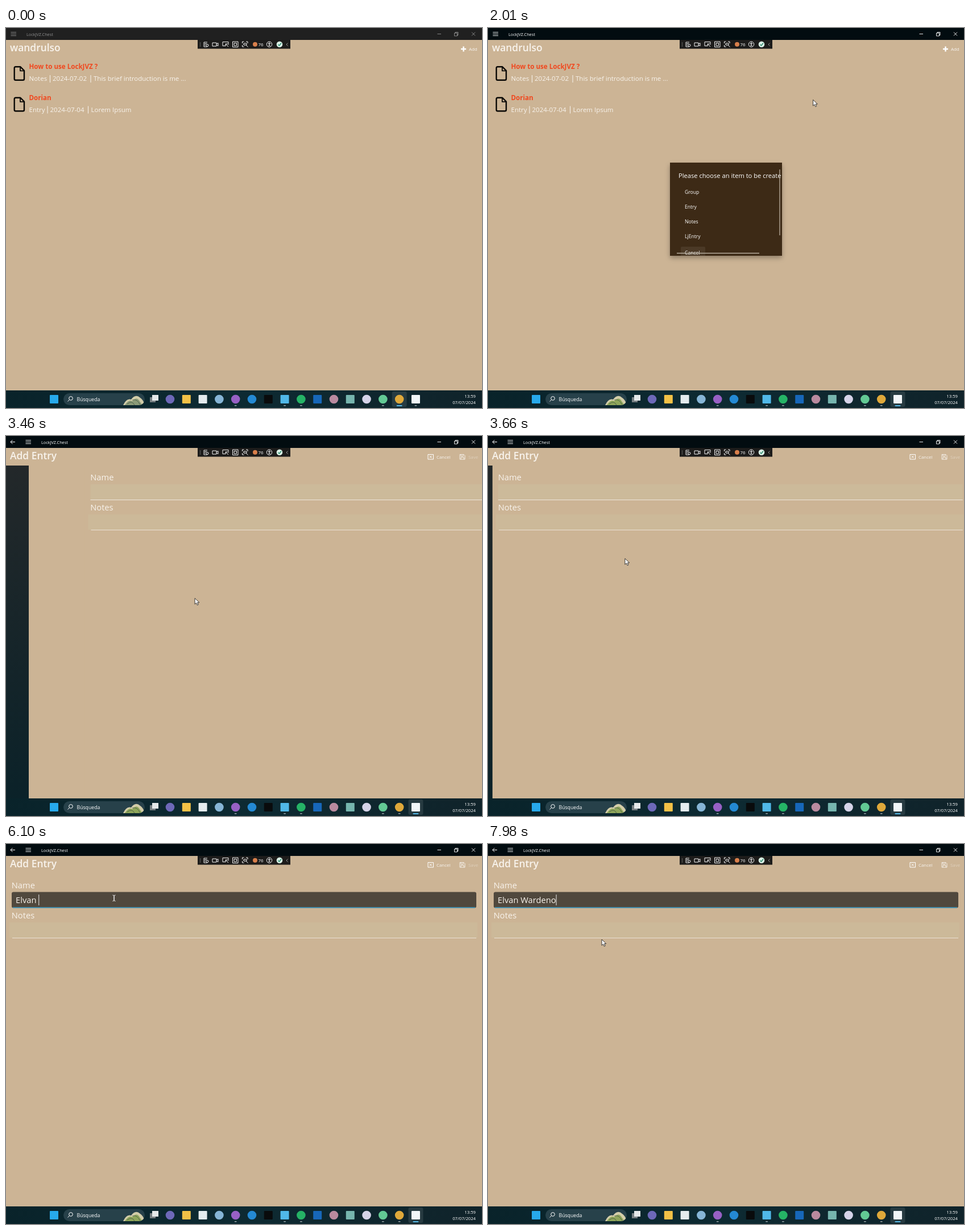
Recreate the animation shown at these times as an HTML page. Size 837x669 px, loop 8 s.

```html
<!DOCTYPE html>
<html lang="es">
<head>
<meta charset="utf-8">
<title>Vault</title>
<style>
  html, body { margin: 0; width: 100%; height: 100%; overflow: hidden; background: #ccb495; }
  svg { display: block; width: 837px; height: 669px; font-family: "Open Sans", "Noto Sans", sans-serif; }
  text { white-space: pre; }
  .line { fill: none; stroke: #fff; }
  .head { font-size: 17.4px; font-weight: 600; fill: #f8f3ec; }
  .name { font-size: 11.6px; font-weight: 700; fill: #f0481f; }
  .sub { font-size: 11.5px; fill: #f8f3ec; }
  .field { font-size: 14.7px; fill: #f8f3ec; }
  .item { font-size: 8.6px; fill: #fff; }
  .tool { font-size: 7.9px; fill: #fff; }
</style>
</head>
<body>
<svg viewBox="0 0 837 669">
  <defs>
    <linearGradient id="edge" x2="0" y2="1"><stop stop-color="#23282a"/><stop offset="1" stop-color="#0b2229"/></linearGradient>
    <linearGradient id="bar"><stop stop-color="#09232a"/><stop offset=".5" stop-color="#0d2a32"/><stop offset="1" stop-color="#10232a"/></linearGradient>
    <filter id="shade" x="-10%" y="-10%" width="120%" height="125%"><feDropShadow dx="0" dy="4" stdDeviation="4" flood-opacity=".3"/></filter>
    <clipPath id="box"><path d="M320 237h197v164H320z"/></clipPath>
    <clipPath id="pill"><rect x="101" y="643" width="143" height="21" rx="10.5"/></clipPath>
    <g id="doc" fill="none" stroke="#0a0805" stroke-width="2.4" stroke-linejoin="round">
      <path d="M17 68.3h8.3l6.7 6.7v14.4q0 2.3-2.3 2.3H17q-2.3 0-2.3-2.3V70.6q0-2.3 2.3-2.3z"/>
      <path d="M25 69v6.4h6.5" stroke-width="1.8"/>
    </g>
  </defs>

  <path d="M0 0h837v669H0z" fill="#ccb495"/>

  <g id="list">
    <text class="head" x="7" y="41">wandrulso</text>
    <path id="addHover" d="M793 22h44v30h-44z" fill="#fff" opacity="0"/>
    <path d="M800 37h9M804.500 32.500v9" class="line" stroke-width="2.400"/>
    <text class="tool" x="814" y="40" opacity=".85">Add</text>
    <use href="#doc"/><use href="#doc" y="54.500"/>
    <text class="name" x="40.500" y="72">How to use LockJVZ ?</text>
    <text class="sub" y="92.800"><tspan x="40.500">Notes</tspan><tspan x="82">2024-07-02</tspan><tspan x="154">This brief introduction is me ...</tspan></text>
    <text class="name" x="40.500" y="126.800">Dorian</text>
    <text class="sub" y="147.500"><tspan x="40.500">Entry</tspan><tspan x="77.500">2024-07-04</tspan><tspan x="149.500">Lorem Ipsum</tspan></text>
    <path d="M77.500 83v13M149 83v13M73 137.500v13M144.500 137.500v13" class="line" opacity=".85"/>
  </g>

  <g id="form">
    <text class="head" x="7" y="41">Add Entry</text>
    <g class="line">
      <path d="M742 32.500h9.500v8.500H742zM744.700 34.700l4 4M748.700 34.700l-4 4"/>
      <path d="M798 32.500h7l2 2v6.500h-9zM800 32.500v3h4v-3M800 41v-3.500h5V41" opacity=".75"/>
    </g>
    <text class="tool" x="757" y="40" opacity=".85">Cancel</text>
    <text class="tool" x="813" y="40" opacity=".35">Save</text>
    <path d="M0 52h40v586H0z" fill="url(#edge)"/>
    <g id="page">
      <path d="M0 52h837v586H0z" fill="#ccb495"/>
      <text class="field" x="9.800" y="77.500">Name</text>
      <text class="field" x="9.800" y="130.500">Notes</text>
      <g id="idle">
        <path d="M10 85h817v27.500H10z" fill="#ccba9a"/>
        <path d="M10 112.500h817" class="line" opacity=".65"/>
      </g>
      <path d="M6 138h823v27H6z" fill="#ccb999"/>
      <path d="M11 165.500h816" class="line" opacity=".6"/>
      <g id="active">
        <rect x="10" y="84.500" width="817" height="28" rx="3" fill="#50483d"/>
        <path d="M12 112h813" stroke="#3d9fc8" stroke-width="1.500"/>
        <text id="typed" class="field" x="17" y="103.500"></text>
        <path id="caret" d="M.5 89v19" class="line" stroke-width=".9"/>
      </g>
    </g>
  </g>

  <g id="dialog">
    <path d="M320 237h197v164H320z" fill="#3d2c17" filter="url(#shade)"/>
    <g clip-path="url(#box)">
      <text x="335" y="263.700" font-size="11.150" fill="#fff">Please choose an item to be create</text>
      <rect id="rowHover" x="338" width="180" height="23" rx="2" fill="#fff" opacity=".06"/>
      <g id="items"></g>
      <rect x="339" y="385" width="43" height="20" rx="2" fill="#fff" opacity=".07"/>
      <text class="item" x="346" y="398.500">Cancel</text>
      <path d="M332 396.500h145M513 249v116" stroke="#b9ae9f" stroke-width="1.300"/>
    </g>
  </g>

  <path id="titleBar" d="M0 0h837v21H0z"/>
  <g id="chrome">
    <path id="back" d="M16 10.500H8M11.500 7L8 10.500l3.500 3.500" class="line"/>
    <path id="menu" d="M8.500 7.500h9.500M8.500 10.500h9.500M8.500 13.500h9.500" class="line" stroke-width=".9"/>
    <text id="title" y="13.500" font-size="7.300" fill="#fff">LockJVZ.Chest</text>
    <path d="M758.500 10.500h6.500M788.500 9h5v5h-5zM790 9V7.500h5V12.500h-1.500M819 7.500l6 6M825 7.500l-6 6" class="line" stroke-width=".9"/>
  </g>

  <path d="M337 21h163v15.500H337z" fill="#1d1c1b"/>
  <g class="line" stroke-width=".95">
    <path d="M341.500 25v8" opacity=".3"/>
    <path d="M354 33h-6v-8h6M349 27.500h4M349 30h2"/><circle cx="354" cy="30.500" r="2"/>
    <path d="M363 26h7v6h-7zM370 28l3-1.500v5l-3-1.500"/>
    <path d="M386 31.500h-5V24.500h10v5M386 28l5 5M386 28v4M386 28h4"/>
    <path d="M398.500 24h9.500v9.500h-9.500zM401 26.500h4.500v4.500H401z"/>
    <path d="M415.500 27v-3h3M422 24h3v3M415.500 30v3h3M418 27h5v3h-5zM422 30l3.500 3.500"/>
    <circle cx="463" cy="28.700" r="4.700"/><path d="M460.500 27.500h5M463 27.500v2l-1.500 2.500M463 29.500l1.500 2.500"/><circle cx="463" cy="26" r=".4"/>
    <path d="M495.500 26.500l-2.500 2.500 2.500 2.500" opacity=".6"/>
  </g>
  <circle cx="438" cy="28.700" r="4" fill="#d97f4b"/>
  <text x="443.500" y="31.700" font-size="8" fill="#fff">76</text>
  <circle cx="481" cy="28.700" r="5.300" fill="#d9eee4"/>
  <path d="M478.500 29l2 2 3.500-4.500" fill="none" stroke="#26886b" stroke-width="1.300"/>

  <path d="M0 638h837v31H0z" fill="url(#bar)"/>
  <g clip-path="url(#pill)">
    <path d="M101 643h143v21H101z" fill="#27414a"/>
    <path d="M206 664q6-13 14-10 8-11 16-3 6 4 8 13z" fill="#d3cda9"/>
    <path id="hill" d="M209 664q7-11 13-7 8-9 13 0l5 7z"/>
    <path d="M213 662q9-7 13 2M222 655q9-3 14 9" fill="none" stroke="#405440" stroke-width=".8"/>
  </g>
  <g class="line"><circle cx="114" cy="652" r="3.300"/><path d="M111.500 654.500l-3 3"/></g>
  <text x="124.500" y="656.500" font-size="8.700" fill="#fff">Búsqueda</text>
  <path d="M253 650h10v9h-10z" fill="#777f82"/><path d="M257 646h11v10h-11z" fill="#e5e8e9"/>
  <rect id="spot" y="640" width="26" height="27" rx="3" fill="#fff" opacity=".1"/>
  <g id="icons"></g>
  <rect id="mark" y="664" width="10" height="2" rx="1" fill="#55b9e8"/>
  <g font-size="7.700" fill="#fff" text-anchor="end"><text x="826" y="651">13:59</text><text x="826" y="661.500">07/07/2024</text></g>

  <g id="pointer">
    <path id="arrow" d="M0 0v10.500l2.500-2.300 1.700 3.900 1.900-.8-1.700-3.800h3.400z" fill="#fff" stroke="#111" stroke-width=".8"/>
    <path id="beam" d="M-2.500-5q2.500 0 2.500 1.500V4q0 1.500-2.500 1.500M2.500-5Q0-5 0-3.500V4q0 1.500 2.500 1.500" fill="none" stroke="#eee"/>
  </g>
</svg>
<script>
const $ = id => document.getElementById(id);
const show = (id, on) => $(id).style.display = on ? "" : "none";
const opacity = (id, v) => $(id).setAttribute("opacity", v);
const move = (id, x, y = 0) => $(id).setAttribute("transform", `translate(${x} ${y})`);
const ramp = (t, from, to) => Math.min(1, Math.max(0, (t - from) / (to - from)));

const LOOP = 8000, FOCUS = 1670, PAGE = 3460, EDIT = 4270;
const ROW = 26.2, ROW_TOP = 276;
const NAME = "Elvan Wardeno";
const KEYS = [5210, 5480, 5570, 5670, 5770, 5930, 6130, 6390, 6510, 6640, 6790, 7030, 7240];
const PATH = [ // time, x, y
  [400, 840, 190], [890, 808, 37], [1670, 808, 37], [2010, 572, 126], [2410, 410, 290],
  [2510, 410, 290], [3010, 376, 331], [3300, 368, 312], [3400, 360, 307],
  [3660, 241, 216], [4060, 190, 95], [7770, 190, 95], [7980, 200, 168]
];

$("items").innerHTML = ["Group", "Entry", "Notes", "LjEntry"]
  .map((s, i) => `<text class="item" x="346" y="${290.5 + i * ROW}">${s}</text>`).join("");

// colour, then "o" for round; spaced evenly from the third slot on
const APPS = ["#6d68b8o", "#f3c146", "#e4ebee", "#86b5d6o", "#9860c5o", "#2489d3o", "#090b0c",
  "#50b8e8", "#25b366o", "#1767b9", "#b98a9fo", "#76b5ae", "#d5d3e8o", "#62c994o", "#dfa83ao", "#f2f6f8"];
const shape = (x, spec) => {
  const fill = spec.slice(0, 7);
  return spec[7] ? `<circle cx="${x}" cy="653.5" r="7.8" fill="${fill}"/>`
    : `<rect x="${x - 7.5}" y="646" width="15" height="15" rx="1" fill="${fill}"/>`;
};
const slot = i => 288.5 + i * 28.8;
$("icons").innerHTML = shape(84.5, "#27a9eb") + APPS.map((a, i) => shape(slot(i), a)).join("") +
  [4, 7, 8, 13, 14, 15].map(i => `<rect x="${slot(i) - 2}" y="664" width="4" height="1.6" rx=".8" fill="#9aa5a9"/>`).join("");

function pointerAt(t) {
  const i = PATH.findIndex(p => p[0] > t);
  if (i < 0) return PATH.at(-1).slice(1);
  if (!i) return PATH[0].slice(1);
  const [a, b] = [PATH[i - 1], PATH[i]], k = ramp(t, a[0], b[0]);
  return [1, 2].map(n => a[n] + (b[n] - a[n]) * k);
}

function draw(t) {
  const focused = t >= FOCUS, form = t >= PAGE, editing = t >= EDIT;
  const [x, y] = pointerAt(t);

  $("titleBar").setAttribute("fill", focused ? "#020c10" : "#202020");
  opacity("chrome", focused ? 1 : .5);
  show("back", form);
  move("menu", form ? 26 : 0);
  $("title").setAttribute("x", form ? 62 : 36);
  $("hill").setAttribute("fill", focused ? "#8fa65b" : "#8c9b78");
  const app = slot(focused ? 15 : 14);
  move("spot", app - 13);
  move("mark", app - 5);

  show("list", !form);
  show("form", form);
  opacity("addHover", focused ? 0 : .08 * ramp(t, 860, 1160));
  move("page", 140 * (1 - ramp(t, PAGE, PAGE + 500)) ** 5.6);

  const open = ramp(t, 1740, 1920) * (1 - ramp(t, 3340, 3450));
  show("dialog", open > 0);
  opacity("dialog", open);
  move("items", 0, 1.3 * (1 - ramp(t, 2010, 2200)));
  const row = Math.floor((y - ROW_TOP + 1) / ROW);
  show("rowHover", t > 2010 && x > 338 && x < 517 && row >= 0 && row < 4);
  $("rowHover").setAttribute("y", ROW_TOP + row * ROW);

  show("idle", !editing);
  show("active", editing);
  if (editing) {
    const text = NAME.slice(0, KEYS.filter(k => k <= t).length);
    $("typed").textContent = text;
    move("caret", 17 + (text && $("typed").getComputedTextLength()));
  }

  const overField = form && (y > 85 && y < 113 || y > 138 && y < 166);
  show("pointer", t >= PATH[0][0]);
  show("arrow", !overField);
  show("beam", overField);
  move("pointer", x, y);
}

function frame() {
  draw(performance.now() % LOOP);
  requestAnimationFrame(frame);
}
frame();
</script>
</body>
</html>
```
